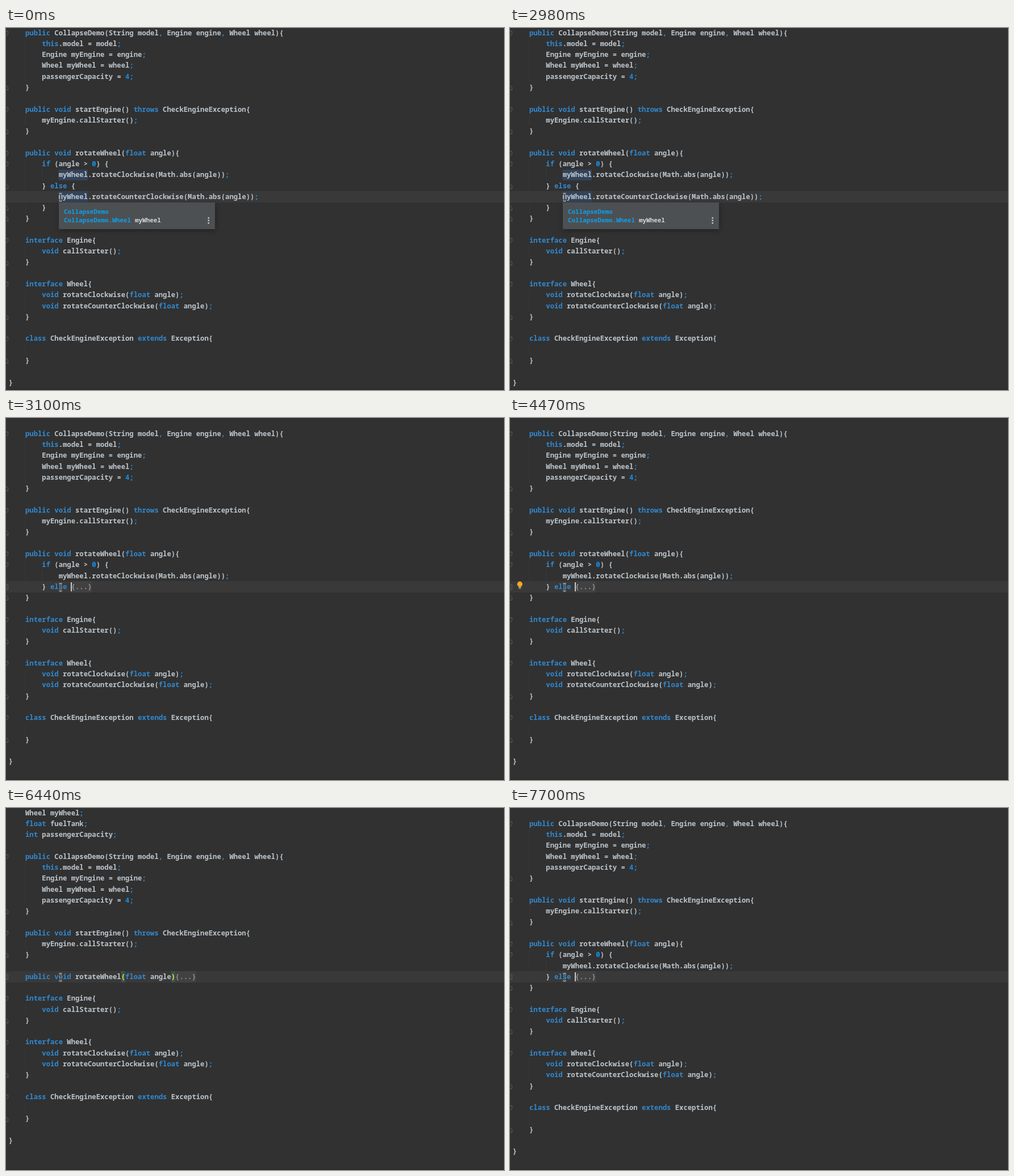
These frames come from a looping animation (877 by 639 pixels, 8000 ms). An HTML page with a canvas:

```html
<!DOCTYPE html>
<html lang="en">
<head>
<meta charset="utf-8">
<title>Code folding</title>
<style>
  html, body { margin: 0; width: 100%; height: 100%; overflow: hidden; background: #313131; }
  canvas { display: block; }
</style>
</head>
<body>
<canvas id="stage" width="877" height="639"></canvas>
<script>
const ctx = document.getElementById('stage').getContext('2d');
const W = 877, H = 639, LOOP = 8000;
const LEFT = 4.67, CHAR = 7.335, PITCH = 19.28, FIRST = 8.7, ACTIVE = 15;
const MONO = '"Noto Sans Mono", "DejaVu Sans Mono", monospace';
const font = (weight, size) => `${weight} ${size}px ${MONO}`;
const COLOR = {
  back: '#313131', line: '#393939', guide: '#393939', text: '#bcc5cc',
  key: '#3189d0', num: '#1590ea', fold: '#8e8e8e', foldBack: '#414141',
  usage: '#334359', brace: '#ffee2a', braceBack: '#3b514d', icon: '#5d5d5d',
  popup: '#4c5052', link: '#0d9fec'
};

const head = `    Wheel myWheel;
    float fuelTank;
    int passengerCapacity;

    public CollapseDemo(String model, Engine engine, Wheel wheel){
        this.model = model;
        Engine myEngine = engine;
        Wheel myWheel = wheel;
        passengerCapacity = 4;
    }

    public void startEngine() throws CheckEngineException{
        myEngine.callStarter();
    }
`;
const tail = `
    interface Engine{
        void callStarter();
    }

    interface Wheel{
        void rotateClockwise(float angle);
        void rotateCounterClockwise(float angle);
    }

    class CheckEngineException extends Exception{

    }

}`;
const method = '    public void rotateWheel(float angle){';
const branch = `${method}
        if (angle > 0) {
            myWheel.rotateClockwise(Math.abs(angle));
        } else {`;
const open = `${branch}
            myWheel.rotateCounterClockwise(Math.abs(angle));
        }
    }`;
const build = body => [head, body, tail].join('\n').split('\n');

const scenes = {
  expanded: { lines: build(open), skip: 4, caret: 12 },
  elseFolded: { lines: build(`${branch}...}\n    }`), skip: 3, caret: 15 },
  methodFolded: { lines: build(`${method}...}`), skip: 0, caret: 40 }
};

// Each entry: start time in ms, value
const sceneTimes = [[0, 'expanded'], [3040, 'elseFolded'], [4650, 'methodFolded'], [7700, 'elseFolded']];
const caretTimes = [
  [0, 0], [480, 1], [1020, 0], [1500, 1], [1970, 0], [2450, 1], [2980, 0], [3040, 1],
  [4000, 0], [4470, 1], [5490, 0], [5970, 1], [6440, 0], [6980, 1], [7460, 0], [7700, 1]
];
const bulbTimes = [[0, 0], [3880, 1], [4650, 0], [5430, 1], [6080, 0], [6860, 1], [7700, 0]];
const at = (track, t) => track.filter(([start]) => start <= t).pop()[1];

const colX = col => LEFT + col * CHAR;
const rowY = row => FIRST + row * PITCH;
const TOKEN = /\{\.\.\.\}|\b(?:public|void|float|int|this|if|else|interface|class|extends|throws)\b|\d+|[;,]|[^\s;,{}()]+|[{}()]/g;
const KEYWORD = /^(public|void|float|int|this|if|else|interface|class|extends|throws|;|,)$/;

function box(x, y, w, h, color) {
  ctx.fillStyle = color;
  ctx.fillRect(x, y, w, h);
}

function path(points, color, width) {
  ctx.beginPath();
  points.forEach(([x, y], i) => i ? ctx.lineTo(x, y) : ctx.moveTo(x, y));
  ctx.strokeStyle = color;
  ctx.lineWidth = width;
  ctx.stroke();
}

function write(str, x, y, color) {
  ctx.fillStyle = color;
  ctx.fillText(str, x, y);
}

function cells(row, col, count, color) {
  const top = Math.round(rowY(row) - PITCH / 2);
  box(colX(col), top, count * CHAR, Math.round(rowY(row) + PITCH / 2) - top, color);
}

function drawLine(str, row) {
  const base = Math.round(rowY(row) + 3.9);
  for (const { 0: word, index } of str.matchAll(TOKEN)) {
    let color = COLOR.text;
    if (word === '{...}') {
      cells(row, index, 5, COLOR.foldBack);
      color = COLOR.fold;
    } else if (KEYWORD.test(word)) color = COLOR.key;
    else if (/^\d/.test(word)) color = COLOR.num;
    write(word, colX(index), base, color);
  }
}

function drawGutter(str, row) {
  const y = Math.round(rowY(row)) + 0.5;
  if (str.includes('{...}')) {
    path([[0, y - 4], [3.5, y - 4], [3.5, y + 4], [0, y + 4]], COLOR.icon, 1);
    path([[0, y], [1.5, y]], COLOR.icon, 1);
  } else if (/^ +\}/.test(str)) {
    path([[0, y - 4], [3.5, y - 1], [3.5, y + 4], [0, y + 4]], COLOR.icon, 1);
  } else if (str.endsWith('{')) {
    path([[0, y - 4], [3.5, y - 4], [3.5, y + 1], [0, y + 4]], COLOR.icon, 1);
  }
}

function drawGuides(lines, skip) {
  const blocks = [];
  lines.forEach((str, i) => {
    if (/^ *\}/.test(str)) blocks.pop();
    for (const col of blocks) {
      box(Math.round(colX(col)), rowY(i - skip) - PITCH / 2, 1, PITCH, COLOR.guide);
    }
    if (str.endsWith('{')) blocks.push(str.search(/\S/));
  });
}

function drawPopup() {
  ctx.save();
  ctx.shadowColor = 'rgba(0,0,0,.3)';
  ctx.shadowBlur = 9;
  ctx.shadowOffsetX = 1;
  ctx.shadowOffsetY = 3;
  box(93, 308, 275, 47, COLOR.popup);
  ctx.restore();
  ctx.font = font(600, 10.93);
  write('CollapseDemo', 102, 328, COLOR.link);
  write('CollapseDemo.Wheel', 102, 342.5, COLOR.link);
  write('myWheel', 227, 342.5, '#d3d6d8');
  for (let y = 334; y < 345; y += 4.5) box(355.5, y, 2.5, 2.5, '#c3c7c9');
}

function drawBulb() {
  ctx.fillStyle = '#f2a926';
  ctx.beginPath();
  ctx.arc(17.3, 293.2, 4.6, 0, Math.PI * 2);
  ctx.fill();
  box(15, 296, 4.6, 2.6, '#f2a926');
  box(15, 299, 4.6, 1, '#b0b0b0');
  box(15.5, 300.5, 3.6, 1, '#b0b0b0');
}

function drawPointer() {
  const x = 96;
  for (const [color, width] of [['#e8e8e8', 2.2], ['#151515', 0.9]]) {
    for (const side of [-1, 1]) {
      path([[x + side * 2.6, 292.2], [x + side, 292.5], [x, 293.8], [x, 304],
        [x + side, 305.2], [x + side * 2.6, 305.5]], color, width);
    }
  }
}

function draw(t) {
  const name = at(sceneTimes, t);
  const { lines, skip, caret } = scenes[name];
  const expanded = name === 'expanded';
  box(0, 0, W, H, COLOR.back);
  cells(ACTIVE, -1, 121, COLOR.line);
  drawGuides(lines, skip);
  if (expanded) [13, 15].forEach(row => cells(row, 12, 7, COLOR.usage));

  ctx.font = font(600, 12.22);
  lines.forEach((str, i) => {
    drawLine(str, i - skip);
    drawGutter(str, i - skip);
  });

  if (name === 'methodFolded') {
    ctx.font = font(700, 12.22);
    [[27, '('], [39, ')']].forEach(([col, mark]) => {
      cells(ACTIVE, col, 1, COLOR.braceBack);
      write(mark, colX(col), 302, COLOR.brace);
    });
  }
  if (expanded) drawPopup();
  if (at(caretTimes, t)) {
    const x = Math.floor(colX(caret));
    if (expanded) box(x, 293, 2, 12, '#bbbbbb');
    else box(x, 290, 2, 16, '#c8c8c8');
  }
  if (at(bulbTimes, t)) drawBulb();
  drawPointer();
  box(0, 637, W, 2, '#2c2c2c');
}

function tick() {
  draw(performance.now() % LOOP);
  requestAnimationFrame(tick);
}
tick();
</script>
</body>
</html>
```
